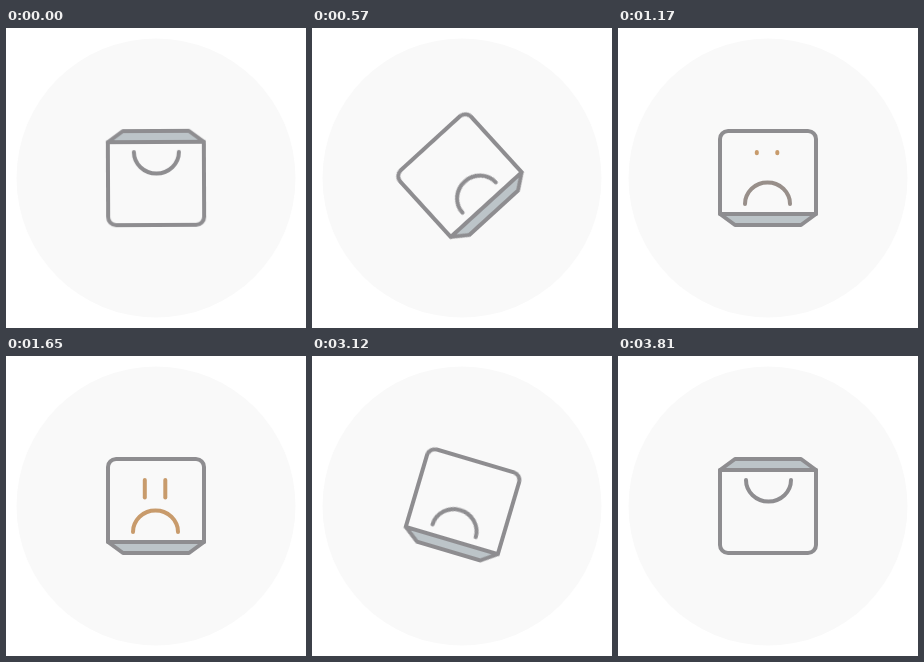
Write an HTML page without scripts that moves like this. It is 300x300 px and loops after 4.53 s.

```html
<!DOCTYPE html>
<html lang="en">
<head>
<meta charset="utf-8">
<title>Empty bag</title>
<style>
  html, body { margin: 0; width: 100%; height: 100%; overflow: hidden; background: #fff; }
  svg { display: block; width: 100%; height: 100%; }

  .bag, .eye, .mouth { animation: 4530ms linear infinite; }
  .bag {
    transform-origin: 150px 150px;
    animation-name: flip;
    fill: none;
    stroke: #8e8d90;
    stroke-width: 4;
    stroke-linejoin: round;
    stroke-linecap: round;
  }
  .opening { fill: #bcc4c8; }
  .mouth { animation-name: tint; }
  .eye { stroke: #c89b6c; stroke-dasharray: 1 2; animation-name: draw; }

  /* Each turn: wind up backwards, swing past the goal, settle */
  @keyframes flip {
    0% { transform: rotate(0deg); animation-timing-function: cubic-bezier(.33, .67, .67, 1); }
    3.532% { transform: rotate(-20deg); animation-timing-function: cubic-bezier(.37, 0, .63, 1); }
    16.887% { transform: rotate(185deg); animation-timing-function: cubic-bezier(.33, 0, .67, .33); }
    19.868% { transform: rotate(180deg); }
    64.238% { transform: rotate(180deg); animation-timing-function: cubic-bezier(.33, .67, .67, 1); }
    67.77% { transform: rotate(200deg); animation-timing-function: cubic-bezier(.37, 0, .63, 1); }
    81.126% { transform: rotate(-5deg); animation-timing-function: cubic-bezier(.33, 0, .67, .33); }
    84.106%, 100% { transform: rotate(0deg); }
  }
  @keyframes draw {
    0%, 23.841% { stroke-dashoffset: 1.1; }
    36.424%, 56.954% { stroke-dashoffset: 0; }
    64.238%, 100% { stroke-dashoffset: 1.1; }
  }
  @keyframes tint {
    0%, 23.841% { stroke: #8e8d90; }
    35.762%, 56.954% { stroke: #c89b6c; }
    64.238%, 100% { stroke: #8e8d90; }
  }
</style>
</head>
<body>
<svg viewBox="0 0 300 300">
  <circle cx="150" cy="150" r="139.5" fill="#f9f9f9"/>
  <g class="bag">
    <path d="M102 114H198V189a8 8 0 0 1-8 8H110a8 8 0 0 1-8-8Z"/>
    <path class="opening" d="M102 114L117 103H183L198 114Z"/>
    <path class="mouth" d="M128 124a22.5 21.5 0 0 0 45 0"/>
    <!-- Eyes sit upright once the bag is upside down -->
    <g transform="rotate(180 150 150)">
      <path class="eye" pathLength="1" d="M138.8 124V141.5"/>
      <path class="eye" pathLength="1" d="M159.3 124V141.5"/>
    </g>
  </g>
</svg>
</body>
</html>
```
